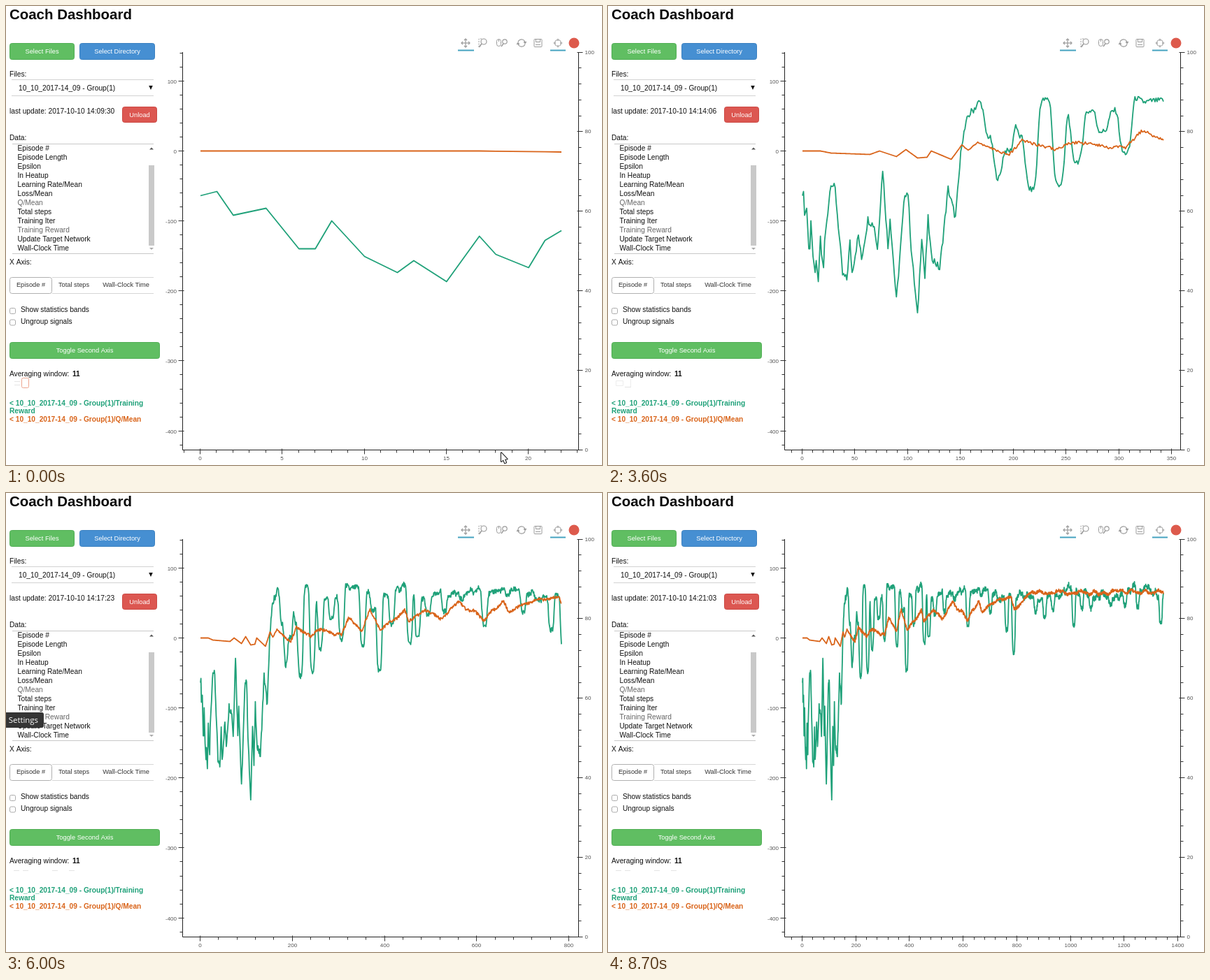
These frames come from a looping animation (852 px wide and 657 px high, 9000 ms). An HTML page with a canvas:

```html
<!DOCTYPE html>
<html lang="en">
<head>
<meta charset="utf-8">
<title>Coach Dashboard</title>
<style>
html, body { margin: 0; width: 100%; height: 100%; overflow: hidden; background: #fff; }
canvas { display: block; }
</style>
</head>
<body>
<canvas id="stage" width="852" height="657"></canvas>
<script>
const ctx = document.getElementById('stage').getContext('2d');
const LOOP = 9000, STEP = 300, EPISODES = 1345, WINDOW = 11;
const SANS = '"Liberation Sans", Arial, sans-serif';
const GREEN = '#1fa179', ORANGE = '#d9641a';
const PLOT = { left: 252.5, right: 818.5, top: 66, bottom: 635.5, x0: 278, x1: 794, zero: 207.5 };

// Step, last episode, elapsed seconds
const PROGRESS = [
  [0, 22, 0], [8, 166, 176], [12, 342, 276], [17, 565, 384],
  [20, 783, 473], [25, 1107, 605], [29, EPISODES, 693]
];

// Main turning points of the reward while the agent still explores
const EXPLORE = [
  [0, -64], [1, -58], [2, -92], [4, -82], [6, -140], [7, -140], [8, -100], [10, -151], [12, -174],
  [13, -157], [15, -187], [17, -122], [18, -148], [20, -167], [21, -128], [27, -44], [31, -55],
  [38, -177], [42, -184], [45, -131], [47, -174], [53, -121], [56, -155], [62, -98], [68, -107],
  [71, -141], [76, -25], [81, -139], [83, -95], [89, -214], [97, -60], [100, -60], [103, -139],
  [109, -237], [113, -121], [116, -182], [119, -97], [122, -150], [130, -169], [138, -54],
  [145, -96], [151, 13], [157, 50], [168, 71]
];

// Bad runs on the later plateau: episode, reward at the bottom
const DIPS = [
  [178, 20], [187, -40], [195, 0], [208, 20], [217, -55], [243, -48], [260, -15], [284, 28],
  [306, -3], [352, -12], [374, 38], [388, -48], [415, 18], [454, -8], [471, 0], [494, 32],
  [529, 38], [616, 18], [700, 36], [761, 11], [787, -20], [869, 38], [903, 30], [933, 40],
  [1011, 18], [1041, 42], [1075, 42], [1147, 48], [1202, 46], [1249, 44], [1335, 20]
];

const Q_MEAN = [
  [0, 0], [17, 0], [27, -3], [64, -5], [73, 0], [89, -8], [98, 2], [109, -10], [118, -9], [122, 0],
  [141, -12], [151, 8], [157, 0], [166, 12], [195, -7], [208, 17], [240, 1], [272, 15], [306, 2],
  [322, 26], [350, 7], [368, 38], [390, 12], [443, 38], [452, 22], [485, 38], [520, 26], [560, 49],
  [617, 26], [657, 51], [669, 33], [706, 50], [777, 59], [788, 42], [854, 65], [EPISODES, 65]
];

function noise(n) {
  const s = Math.sin(n * 12.9898) * 43758.5453;
  return (s - Math.floor(s)) * 2 - 1;
}

// Smooth noise with one random value per `period`
function wave(n, period, seed) {
  const i = Math.floor(n / period), p = n / period - i;
  const ease = p * p * (3 - 2 * p);
  return noise(i + seed) * (1 - ease) + noise(i + 1 + seed) * ease;
}

function at(knots, x) {
  let i = 0;
  while (i < knots.length - 2 && knots[i + 1][0] <= x) i++;
  const [[xa, ya], [xb, yb]] = knots.slice(i, i + 2);
  return ya + (yb - ya) * (x - xa) / (xb - xa);
}

function rewardAt(n) {
  if (n <= 168) return at(EXPLORE, n) + (n > 22 ? 6 * noise(n) : 0);
  const plateau = 63 + 9 * wave(n, 40, 5) + 6 * wave(n, 9, 70);
  const dipped = DIPS.reduce((v, [center, low]) =>
    v + (low - v) * Math.exp(-(((n - center) / (WINDOW / 2 + 1)) ** 4)), plateau);
  return dipped + 4 * noise(n);
}

function qAt(n) {
  const grow = Math.min(1, Math.max(0, (n - 140) / 60));
  return at(Q_MEAN, n) + grow * (4 * wave(n, 17, 300) + 2.2 * noise(n + 4001));
}

const episodes = Array.from({ length: EPISODES + 1 }, (_, n) => n);
const reward = episodes.map(rewardAt);
const qMean = episodes.map(qAt);

function progress(step) {
  // Episodes are longer at the start
  const eased = step < 8 ? 8 * (step / 8) ** 1.3 : step;
  return {
    last: Math.round(at(PROGRESS, eased)),
    seconds: Math.round(at(PROGRESS.map(([s, , sec]) => [s, sec]), step))
  };
}

function text(str, x, y, size = 10.2, color = '#111', align = 'left', font = SANS, weight = '') {
  ctx.font = `${weight} ${size}px ${font}`;
  ctx.fillStyle = color;
  ctx.textAlign = align;
  ctx.fillText(str, x, y);
}

function bold(str, x, y, size, color) {
  text(str, x, y, size, color, 'left', SANS, 'bold');
}

function path(points, color, width = 1, closed = false) {
  ctx.beginPath();
  points.forEach(([x, y]) => ctx.lineTo(x, y));
  if (closed) ctx.closePath();
  ctx.strokeStyle = color;
  ctx.lineWidth = width;
  ctx.stroke();
}

function line(x1, y1, x2, y2, color = '#222', width = 1) {
  path([[x1, y1], [x2, y2]], color, width);
}

function box(x, y, w, h, r, fill, stroke) {
  ctx.beginPath();
  ctx.roundRect(x, y, w, h, r);
  if (fill) { ctx.fillStyle = fill; ctx.fill(); }
  if (stroke) { ctx.strokeStyle = stroke; ctx.lineWidth = 1; ctx.stroke(); }
}

function ring(x, y, r, color, from = 0, to = 7) {
  ctx.beginPath();
  ctx.arc(x, y, r, from, to);
  ctx.strokeStyle = color;
  ctx.lineWidth = 1.2;
  ctx.stroke();
}

function triangle(x, y, w, h, color) {
  ctx.beginPath();
  ctx.moveTo(x - w, y);
  ctx.lineTo(x + w, y);
  ctx.lineTo(x, y + h);
  ctx.fillStyle = color;
  ctx.fill();
}

function button(label, x, y, w, h, fill, edge) {
  box(x + .5, y + .5, w - 1, h - 1, 3, fill, edge);
  text(label, x + w / 2, y + h / 2 + 3, 9.3, '#fff', 'center');
}

function sidebar(step, seconds) {
  bold('Coach Dashboard', 5, 19, 20.45, '#0a0a0a');
  button('Select Files', 5, 53, 93, 24, '#60be62', '#50ae54');
  button('Select Directory', 105, 53, 108, 24, '#468fd2', '#3a80c0');

  text('Files:', 5, 101);
  line(8, 105.5, 211, 105.5, '#d2d2d2');
  line(8, 128.5, 211, 128.5, '#d2d2d2');
  text('10_10_2017-14_09 - Group(1)', 18, 121);
  triangle(207, 114, 2.8, 6, '#111');

  const clock = 9 * 60 + 30 + seconds;
  const pad = n => String(n).padStart(2, '0');
  text(`last update: 2017-10-10 14:${pad(Math.floor(clock / 60))}:${pad(clock % 60)}`, 5, 153.5);
  button('Unload', 166, 144, 50, 23, '#dc5751', '#cc4a45');

  text('Data:', 5, 192);
  line(9, 197.5, 211, 197.5, '#c8c8c8');
  line(9, 354.5, 211, 354.5, '#c8c8c8');
  ['Episode #', 'Episode Length', 'Epsilon', 'In Heatup', 'Learning Rate/Mean', 'Loss/Mean', 'Q/Mean',
    'Total steps', 'Training Iter', 'Training Reward', 'Update Target Network', 'Wall-Clock Time']
    .forEach((s, i) => text(s, 16.5, 206.5 + i * 13.03, 10.2, i === 6 || i === 9 ? '#666' : '#111'));
  box(204, 228, 8, 115, 0, '#c9c9c9');
  triangle(208, 205.5, 3, -3, '#555');
  triangle(208, 346, 3, 3, '#aaa');

  text('X Axis:', 5, 370);
  line(66, 388.5, 211, 388.5, '#d6d6d6');
  line(66, 411.5, 211, 411.5, '#d6d6d6');
  box(5.5, 388.5, 60, 23, 3, '#fff', '#b0b0b0');
  text('Episode #', 35.5, 402, 9.25, '#333', 'center');
  text('Total steps', 97, 402, 9.25, '#333', 'center');
  text('Wall-Clock Time', 171.5, 402, 9.25, '#333', 'center');

  box(5.5, 432.5, 8, 8, 2, '#fff', '#aaa');
  box(5.5, 449, 8, 8, 2, '#fff', '#aaa');
  text('Show statistics bands', 21, 438);
  text('Ungroup signals', 21, 454.5);
  button('Toggle Second Axis', 5, 481, 215, 24, '#60be62', '#50ae54');

  text('Averaging window:', 5, 529.5);
  bold(String(WINDOW), 95, 529.5, 10.2, '#111');
  slider(step);

  bold('< 10_10_2017-14_09 - Group(1)/Training', 5, 571.5, 10.17, GREEN);
  bold('Reward', 5, 582.5, 10.17, GREEN);
  bold('< 10_10_2017-14_09 - Group(1)/Q/Mean', 5, 594.5, 10.17, ORANGE);
}

function slider(step) {
  const faint = '#e4e4e4';
  if (step === 0) {
    line(12, 537.5, 20, 537.5, faint);
    line(12, 542.5, 20, 542.5, faint);
    box(22.5, 532.5, 10, 14, 2, '#fff', '#eda58f');
  } else if (step < 20) {
    box(11.5, 536.5, 10, 7, 0, null, '#ececec');
    line(24, 545.5, 33, 545.5, faint);
    line(32.5, 534, 32.5, 545, '#ececec');
  } else {
    [11, 24, 66, 90].forEach(x => line(x, 540.5, x + 8, 540.5, faint));
  }
}

function toolbar() {
  const c = '#9a9a9a', y = 53;
  const sides = [[0, -1], [1, 0], [0, 1], [-1, 0]];

  line(651, y, 663, y, c, 1.2);
  line(657, y - 6, 657, y + 6, c, 1.2);
  sides.forEach(([dx, dy]) => {
    const x = 657 + dx * 6, v = y + dy * 6;
    path([[x - dx * 2 - dy * 2, v - dy * 2 - dx * 2], [x, v], [x - dx * 2 + dy * 2, v - dy * 2 + dx * 2]], c, 1.2);
  });

  ctx.setLineDash([2, 1.5]);
  path([[680, 47], [676, 47], [676, 58], [679, 58]], c, 1);
  ctx.setLineDash([]);
  ring(683, 51, 4, c);
  line(680, 54, 676, 59, c, 1.6);

  box(701.5, 47.5, 6, 10, 3, null, c);
  line(704.5, 48, 704.5, 51, c);
  ring(713, 51, 3.2, c);
  line(711, 54, 708, 58, c, 1.4);

  ring(737, y, 5.2, c, 3.4, 5.9);
  ring(737, y, 5.2, c, .25, 2.75);
  triangle(742, 51, 2.5, 3.5, c);
  triangle(732, 55, 2.5, -3.5, c);

  box(755, 47.5, 11, 11, 1, null, c);
  box(757.5, 47.5, 6, 4, 0, null, c);
  line(757, 55.5, 764, 55.5, c);

  ring(789, y, 4.5, c);
  sides.forEach(([dx, dy]) =>
    line(789 + dx * 3, y + dy * 3, 789 + dx * 6.5, y + dy * 6.5, c));

  line(646, 63.5, 669, 63.5, '#45a3c0', 2);
  line(778, 63.5, 800, 63.5, '#45a3c0', 2);

  ctx.beginPath();
  ctx.arc(812, y, 7.5, 0, 7);
  ctx.fillStyle = '#dd5a4c';
  ctx.fill();
}

function tickStep(range) {
  const base = 10 ** Math.floor(Math.log10(range / 6));
  const miss = s => Math.abs(6 - range / s);
  return [1, 2, 5, 10].map(m => m * base).reduce((a, b) => miss(b) < miss(a) ? b : a);
}

function axes(scale) {
  const { left, right, top, bottom, x0, zero } = PLOT;
  const ink = '#333', label = '#555';
  line(left, top, left, bottom);
  line(left, bottom, right, bottom);
  line(right, top, right, bottom);

  for (let i = -21; i <= 7; i++) {
    const y = Math.round(zero - .5 - i * 20.03) + .5, major = i % 5 === 0;
    line(left - (major ? 6 : 4), y, left + (major ? 2 : 0), y, ink);
    if (major) text(i * 20, 244, y + 3, 8, label, 'right');
  }
  for (let i = 0; i <= 25; i++) {
    const y = Math.round(bottom - .5 - i * 22.78) + .5, major = i % 5 === 0;
    line(right - (major ? 2 : 0), y, right + (major ? 6 : 4), y, ink);
    if (major) text(i * 4, 827.5, y + 2.6, 8, label);
  }
  const minor = tickStep((right - left) / scale) / 5;
  const end = Math.floor((right - x0) / scale / minor);
  for (let i = Math.ceil((left - x0) / scale / minor); i <= end; i++) {
    const x = Math.round(x0 + i * minor * scale) - .5, major = i % 5 === 0;
    line(x, bottom - (major ? 2 : 0), x, bottom + (major ? 6 : 4), ink);
    if (major) text(Math.round(i * minor), x, 650, 8, label, 'center');
  }
}

function plot(values, last, scale, color) {
  const points = values.slice(0, last + 1).map((v, n) => [PLOT.x0 + n * scale, PLOT.zero - v]);
  path(points, color, 1.8);
}

function pointer(x, y) {
  const shape = [[0, 0], [0, 12.5], [3, 10], [5, 14.8], [7, 14], [5, 9.2], [8.5, 9]]
    .map(([dx, dy]) => [x + dx, y + dy]);
  path(shape, '#222', 2.2, true);
  ctx.fillStyle = '#fff';
  ctx.fill();
}

function tooltip() {
  box(-8, 314, 62, 22, 3, '#353535');
  text('System Settings', 46, 329, 11.4, '#fff', 'right', '"Open Sans", sans-serif');
}

function draw(step) {
  const { last, seconds } = progress(step);
  const scale = (PLOT.x1 - PLOT.x0) / last;
  ctx.fillStyle = '#fff';
  ctx.fillRect(0, 0, 852, 657);
  ctx.lineJoin = 'round';
  sidebar(step, seconds);
  toolbar();
  axes(scale);
  plot(reward, last, scale, GREEN);
  plot(qMean, last, scale, ORANGE);
  if (step === 0) pointer(708, 639.5);
  if (step === 20) tooltip();
}

let shown = -1;
function tick() {
  const step = Math.floor(performance.now() % LOOP / STEP);
  if (step !== shown) draw(shown = step);
  requestAnimationFrame(tick);
}
tick();
</script>
</body>
</html>
```
